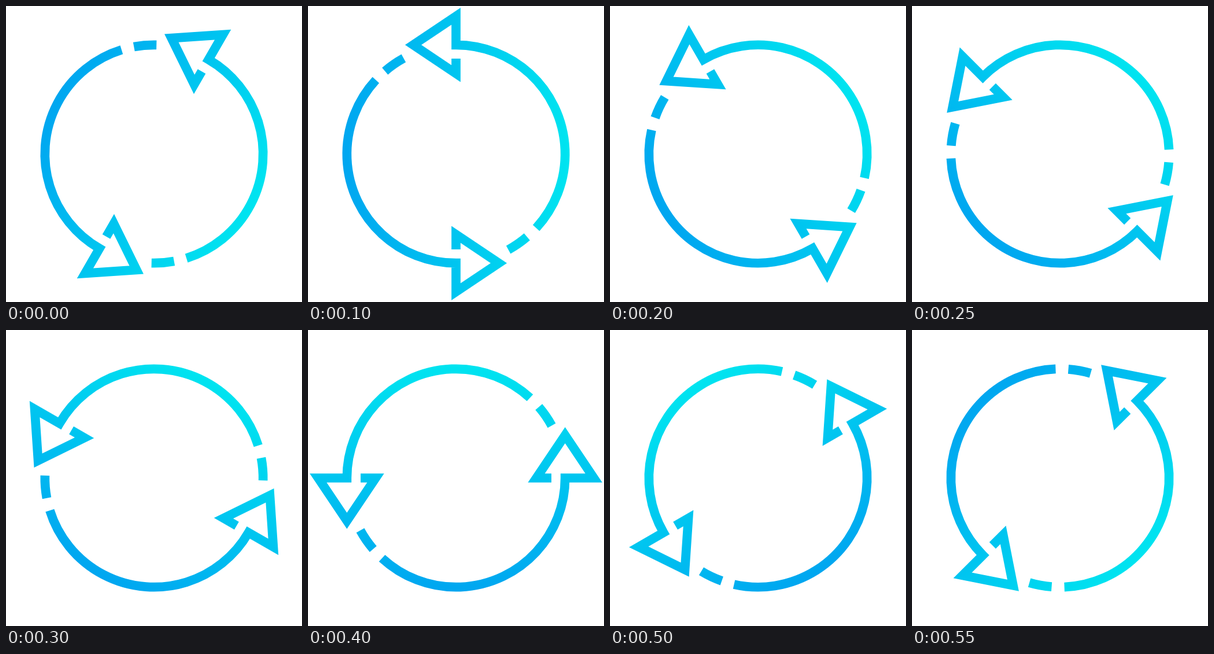
Recreate the animation shown at these times as an HTML page with a canvas. Size 512x512 px, loop 0.6 s.

```html
<!DOCTYPE html>
<html lang="en">
<head>
<meta charset="utf-8">
<title>Rotating arrows</title>
<style>
  html, body { margin: 0; width: 100%; height: 100%; overflow: hidden; background: #fff; }
  canvas { display: block; }
</style>
</head>
<body>
<canvas id="stage" width="512" height="512"></canvas>
<script>
const ctx = document.getElementById('stage').getContext('2d');
const STEP_MS = 50, STEPS = 12, STEP_DEG = 15;
const RADIUS = 188.7, WIDTH = 15.7;
const rad = deg => deg * Math.PI / 180;

function arc(from, to) {
  ctx.arc(0, 0, RADIUS, rad(from), rad(to), true);
}

// Long arc running into an open triangular head, plus the short dash ahead of it.
function drawArrow() {
  const tipX = 74, halfHeight = 49.6;
  ctx.beginPath();
  arc(222.7, 90);
  ctx.lineTo(0, RADIUS + halfHeight);
  ctx.lineTo(tipX, RADIUS);
  ctx.lineTo(0, RADIUS - halfHeight);
  ctx.lineTo(0, 165);
  ctx.stroke();

  ctx.beginPath();
  arc(61.3, 49.4);
  ctx.stroke();
}

function gradient(direction) {
  const fill = ctx.createLinearGradient(-196 * direction, 0, 196 * direction, 0);
  fill.addColorStop(0, '#00a6f0');
  fill.addColorStop(1, '#00e4f0');
  return fill;
}

function draw(time) {
  const step = Math.floor(time / STEP_MS) % STEPS;
  // The last step already belongs to the next half turn.
  const angle = step === STEPS - 1 ? 45 : 30 - step * STEP_DEG;

  ctx.setTransform(1, 0, 0, 1, 0, 0);
  ctx.fillStyle = '#fff';
  ctx.fillRect(0, 0, 512, 512);
  ctx.translate(256, 256);
  ctx.rotate(rad(angle));
  ctx.lineWidth = WIDTH;
  ctx.lineJoin = 'miter';
  for (const direction of [1, -1]) {
    ctx.strokeStyle = gradient(direction);
    drawArrow();
    ctx.rotate(Math.PI);
  }
}

const start = performance.now();
function tick() {
  draw(performance.now() - start);
  requestAnimationFrame(tick);
}
tick();
</script>
</body>
</html>
```
